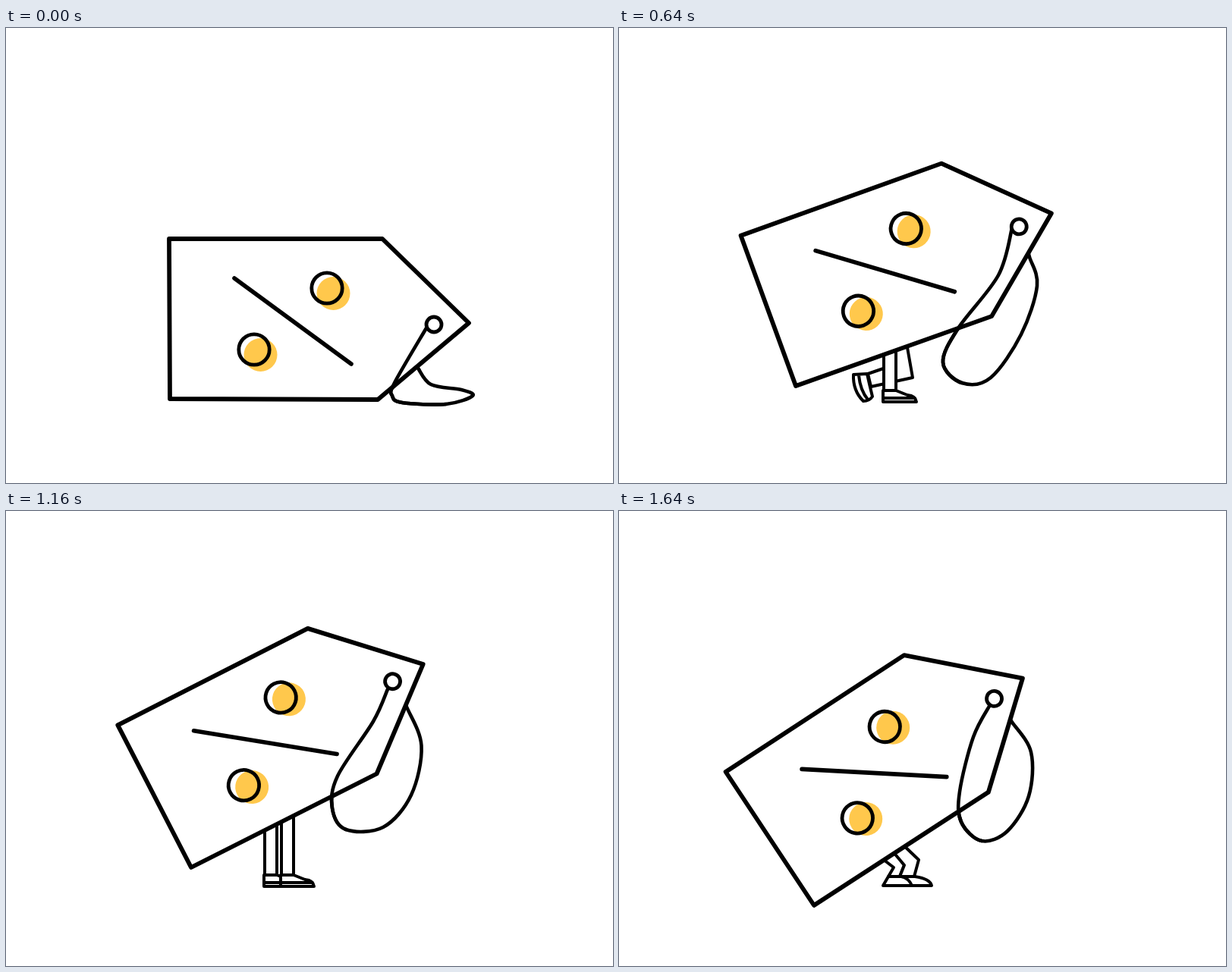
Recreate the animation shown at these times as an HTML page with a canvas. Size 800 by 600 pixels, loop 1.68 s.

```html
<!DOCTYPE html>
<html lang="en">
<head>
<meta charset="utf-8">
<title>Walking price tag</title>
<style>
html, body { margin: 0; width: 100%; height: 100%; overflow: hidden; background: #fff; }
canvas { display: block; width: 800px; height: 600px; }
</style>
</head>
<body>
<canvas id="stage" width="800" height="600"></canvas>
<script>
const LOOP = 1680, YELLOW = '#ffc84c';
const g = document.getElementById('stage').getContext('2d');
g.lineCap = g.lineJoin = 'round';

// String outlines from the hole, round the loop, back to the tag's edge
const ropes = {
  lie:   '555,394 512,468 509,485 522,494 580,496 615,485 600,477 560,470 542,447',
  tilt:  '551,364 531,430 529,466 543,485 592,496 637,481 609,465 578,438 561,398',
  step:  '518,264 500,326 447,396 427,441 452,468 490,461 530,404 551,340 541,302',
  reach: '489,218 484,264 457,345 452,383 470,412 510,412 549,360 553,282 519,239',
  squat: '512,276 496,315 425,395 413,440 432,469 490,467 537,421 551,355 534,300',
  jump:  '490,200 468,246 445,310 443,350 460,377 500,373 527,334 540,270 517,220',
  land:  '490,254 467,298 449,370 451,410 478,435 512,422 540,376 543,318 517,277'
};
for (const k in ropes) ropes[k] = ropes[k].split(' ').map(p => p.split(',').map(Number));

const mix = (a, b, dx = 0, dy = 0) => ropes[a].map(([x, y], i) =>
  [(x + ropes[b][i][0]) / 2 + dx, (y + ropes[b][i][1]) / 2 + dy]);

const stand = ['M349 400V478H365V400Z', 'M348 478V493H392Q391 485 380 484L365 478ZM349 488H390'];
const jumpLegs = [
  'M330 412L348 433L332 468L350 462L366 433L346 400Z',
  'M332 467L350 461Q354 470 361 474L357 483L328 476ZM330 471L358 478',
  'M346 403L366 432L354 458L373 454L380 418L358 394Z',
  'M352 459L373 453Q376 461 389 468L386 479Q368 476 352 459ZM354 460L386 473'];

// Legs as parts, each with an optional shift
const part = (list, dx = 0, dy = 0) => list.map(d => {
  const p = new Path2D();
  p.addPath(new Path2D(d), new DOMMatrix([1, 0, 0, 1, dx, dy]));
  return p;
});

// at: start in ms, x, y: lower left corner, turn: degrees
const poses = [
  { at: 0, x: 216, y: 489, turn: 0, rope: mix('lie', 'lie'), legs: [] },
  { at: 160, x: 218, y: 489, turn: -2.7, rope: mix('lie', 'tilt'), legs: [] },
  { at: 280, x: 221, y: 488, turn: -5.6, rope: mix('tilt', 'tilt'), legs: part([
    'M357 495V486L350 470H366Q370 484 382 485Q390 487 390 495ZM359 489H388',
    'M319 470V495H360Q360 487 350 486L340 470ZM319 489H357']) },
  { at: 400, x: 222, y: 488, turn: -12.5, rope: mix('tilt', 'step', 2, 8),
    legs: [...part(stand), ...part(stand, -28, 2)] },
  { at: 520, x: 222, y: 487, turn: -20, rope: mix('squat', 'squat', -7, 3),
    legs: [...part(stand, 2), ...part(stand, -25, 2)] },
  { at: 640, x: 233, y: 472, turn: -19.8, rope: mix('step', 'step'), legs: [...part([
    'M366 410L378 410L387 461L332 473L328 456L360 445Z',
    'M309 457L327 456Q330 470 334 486Q330 492 322 492Q308 478 309 457ZM316 458Q318 478 328 490']),
    ...part(stand)] },
  { at: 760, x: 247, y: 472, turn: -26.5, rope: mix('step', 'reach', 3, -6), legs: [...part([
    'M344 420L334 478H350L361 410Z',
    'M362 410L384 448L377 466L391 472L402 446L378 400Z',
    'M376 465L391 471Q396 479 412 482L409 491L371 480ZM373 474L411 486']),
    ...part([stand[1]], -15, 1)] },
  { at: 880, x: 260, y: 483, turn: -33.2, rope: mix('reach', 'reach'), legs: part([
    'M334 425L335 451L317 465L326 474L349 457L354 415Z',
    'M316 465L325 474Q328 483 336 486Q338 495 330 495Q315 493 301 480ZL303 475Q315 488 335 490',
    'M350 408L393 467L404 460L368 408Z',
    'M393 467L404 460Q415 464 430 457Q440 453 438 461Q433 472 410 487ZM405 482Q424 474 437 460']) },
  { at: 1040, x: 229, y: 484, turn: -20.9, rope: mix('squat', 'squat'), legs: part([
    'M333 435L331 459L306 465L318 473L341 470L352 435Z',
    'M295 467L312 463Q316 475 321 480Q322 488 316 495L306 497ZM301 466L310 494',
    'M345 435L378 461L371 480H387L397 454L360 428Z',
    'M370 479H386Q388 485 402 486Q404 497 400 497H368ZM369 490H402']) },
  { at: 1160, x: 244, y: 470, turn: -27, rope: mix('squat', 'jump', 2, -3),
    legs: [...part(stand, -8, 2), ...part(stand, 14, 2)] },
  { at: 1280, x: 257.5, y: 462, turn: -33.2, rope: mix('jump', 'jump'), legs: part(jumpLegs) },
  { at: 1400, x: 254.5, y: 444, turn: -33.2, rope: mix('jump', 'jump', -3, -18),
    legs: part(jumpLegs, -3, -18) },
  { at: 1520, x: 257, y: 520, turn: -33.2, rope: mix('land', 'land'), legs: part([
    'M345 457L362 470L355 482H370L376 467L360 445Z',
    'M360 448L376 467L370 482H389L395 460L372 438Z',
    'M371 482H390Q410 485 412 494H380Z',
    'M355 482H372Q382 484 386 494H348Z']) }
];

function stroke(path, width, fill) {
  if (fill) { g.fillStyle = fill; g.fill(path); }
  g.lineWidth = width;
  g.stroke(path);
}

// Smooth curve through the first n + 1 points
function spline(pts, n) {
  const p = new Path2D();
  p.moveTo(...pts[0]);
  for (let i = 0; i < n; i++) {
    const a = pts[i - 1] || pts[i], b = pts[i], c = pts[i + 1], d = pts[i + 2] || c;
    p.bezierCurveTo(b[0] + (c[0] - a[0]) / 6, b[1] + (c[1] - a[1]) / 6,
      c[0] - (d[0] - b[0]) / 6, c[1] - (d[1] - b[1]) / 6, ...c);
  }
  return p;
}

function circle(x, y, r) {
  const p = new Path2D();
  p.arc(x, y, r, 0, 7);
  return p;
}

const body = new Path2D('M-1 -211H280L394 -100L274 1L0 0Z');
const bar = new Path2D('M85 -159L239 -46');
const dots = [[207, -146], [111, -65]];

function inTag(pose, paint) {
  g.save();
  g.translate(pose.x, pose.y);
  g.rotate(pose.turn * Math.PI / 180);
  paint();
  g.restore();
}

function draw(pose) {
  g.fillStyle = '#fff';
  g.fillRect(0, 0, 800, 600);
  g.strokeStyle = '#000';
  for (const leg of pose.legs) stroke(leg, 4, '#fff');

  // The tail end runs on behind the tag
  const [q, p] = pose.rope.slice(-2);
  const rope = [...pose.rope, [p[0] + (p[0] - q[0]) * .4, p[1] + (p[1] - q[1]) * .4]];
  stroke(spline(rope, rope.length - 1), 4.6);

  inTag(pose, () => {
    stroke(body, 5.8, '#fff');
    for (const [x, y] of dots) {
      g.fillStyle = YELLOW;
      g.fill(circle(x + 8.5, y + 7, 22));
      stroke(circle(x, y, 20.2), 4.8);
    }
    stroke(bar, 5.6);
  });
  stroke(spline(rope, 4), 4.6);
  inTag(pose, () => stroke(circle(348, -98, 10), 4.8, '#fff'));
}

const start = performance.now();
function tick() {
  const t = (performance.now() - start) % LOOP;
  draw(poses.filter(p => p.at <= t).pop());
  requestAnimationFrame(tick);
}
tick();
</script>
</body>
</html>
```
